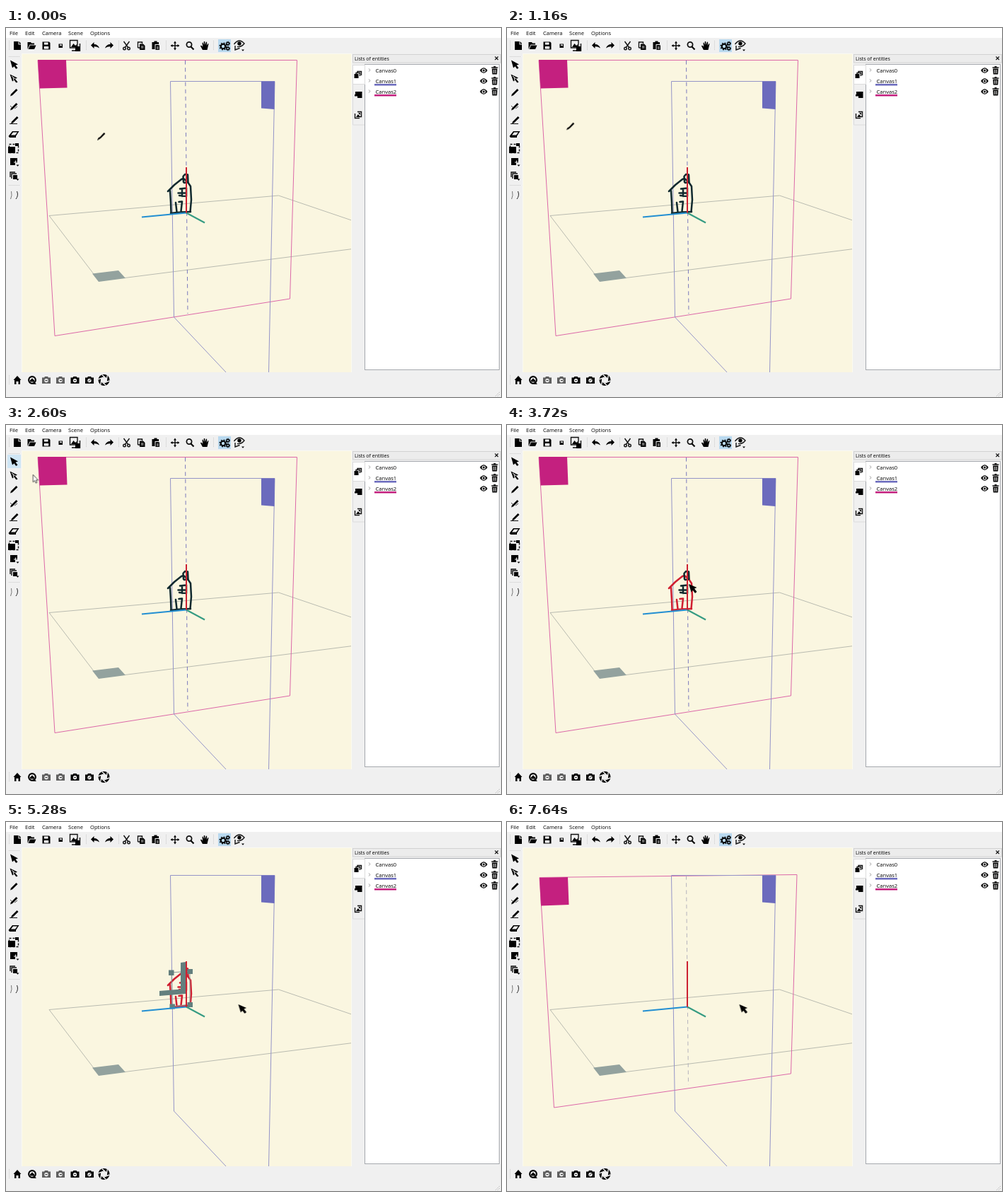
An HTML page for the animation above (8000 ms loop, 700 by 522 pixels).

```html
<!DOCTYPE html>
<html lang="en">
<head>
<meta charset="utf-8">
<title>Sketching on canvases</title>
<style>
html, body { margin: 0; width: 100%; height: 100%; overflow: hidden; background: #f0f0f0; }
svg { display: block; }
text { font: 7.6px "Open Sans", "Noto Sans", sans-serif; fill: #000; }
.line { fill: none; stroke: #111; stroke-width: 1.4; }
.bold { fill: none; stroke: #000; stroke-width: 2.2; }
.thin { fill: none; stroke-width: 1; }
.dash { stroke-dasharray: 5.6 4.6; }
.pink { stroke: #dc68a8; }
.violet { stroke: #9494c8; }
.grey { stroke: #b9bbb0; }
.sep { stroke: #c9c9c9; stroke-dasharray: 1 1; }

/* One shared 8 s clock; hard changes use step-end. */
.cut, #house path { animation: 8s step-end infinite; }
.house { fill: none; stroke: #10292e; stroke-width: 2.5; stroke-linecap: round; stroke-linejoin: round; }
#canvasTall { animation-name: tall; }
#canvasLow { animation-name: low; }
#gizmo { animation-name: gizmo; }
#house { animation-name: house; }
#house .left { animation-name: pickLeft; }
#house .base { animation-name: pickBase; }
#house .right { animation-name: pickRight; }
#house .chimney { animation-name: pickChimney; }
#house .window { animation-name: pickWindow; }
#hover { animation-name: hover; }
#pen { animation-name: pen; }
#arrow { animation-name: arrow; }
#pointer { animation-name: pointer; }
#cursor { animation: move 8s linear infinite; }

@keyframes tall { 0% { visibility: visible } 64.5%, 100% { visibility: hidden } }
@keyframes low { 0% { visibility: hidden } 94%, 100% { visibility: visible } }
@keyframes gizmo { 0% { visibility: hidden } 64.5% { visibility: visible } 94%, 100% { visibility: hidden } }
@keyframes house { 0% { visibility: visible } 94%, 100% { visibility: hidden } }
@keyframes pickLeft { 0% { stroke: #10292e } 43%, 100% { stroke: #d01f31 } }
@keyframes pickBase { 0% { stroke: #10292e } 44.5%, 100% { stroke: #d01f31 } }
@keyframes pickRight { 0% { stroke: #10292e } 45.5%, 100% { stroke: #d01f31 } }
@keyframes pickChimney { 0% { stroke: #10292e } 49%, 100% { stroke: #d01f31 } }
@keyframes pickWindow { 0% { stroke: #10292e } 52%, 100% { stroke: #d01f31 } }
@keyframes hover { 0% { visibility: hidden } 19% { visibility: visible } 33%, 100% { visibility: hidden } }
@keyframes pen { 0% { visibility: visible } 18.5%, 100% { visibility: hidden } }
@keyframes arrow { 0% { visibility: hidden } 18.5% { visibility: visible } 33%, 100% { visibility: hidden } }
@keyframes pointer { 0% { visibility: hidden } 33%, 100% { visibility: visible } }
@keyframes move {
  0%, 9% { transform: translate(129px, 158.5px); animation-timing-function: ease-in }
  14.5% { transform: translate(84px, 144.5px) }
  19.5%, 28.5% { transform: translate(13px, 54px); animation-timing-function: ease-in }
  32.5% { transform: translate(38px, 70px) }
  43% { transform: translate(233px, 238px) }
  44.5% { transform: translate(246px, 256px) }
  46.5% { transform: translate(257px, 225px) }
  49% { transform: translate(252px, 211px) }
  52% { transform: translate(249px, 229px) }
  55%, 58% { transform: translate(240px, 231px); animation-timing-function: ease-in-out }
  63%, 100% { transform: translate(328.5px, 258px) }
}
</style>
</head>
<body>
<svg width="700" height="522" viewBox="0 0 700 522">
  <defs>
    <clipPath id="view"><rect x="23" y="37" width="465" height="450"/></clipPath>
    <path id="brush" d="M-5 5.5L-4 2.5L3.5-5L5.5-3L-2 4.2Z"/>
    <path id="page" d="M-5-6H1.5V-1.5H5V6H-5ZM2.5-6L5-3.2V-2.5H2.5Z"/>
    <path id="select" d="M-5-6L6 0L2.5 1.2L5.5 5L3.2 6.5L.5 2.8L-2 5Z"/>
    <g id="camera"><path d="M-6-3.5H-3L-2-5H2L3-3.5H6V5H-6Z"/><circle cy=".7" r="2.7" fill="#f0f0f0"/></g>
    <g id="eye"><path d="M-5.3 0Q0-7.5 5.3 0Q0 7.5-5.3 0Z"/><circle r="2.6" fill="#fff"/><circle r="1.6"/></g>
    <g id="bin"><path d="M-4.5-4H4.5M-1.5-5.3H1.5" class="line"/><path d="M-3.8-2.5H3.8L3.3 5.5H-3.3Z"/><path d="M-1.6-1V4M0-1V4M1.6-1V4" stroke="#fff" stroke-width=".7"/></g>
    <path id="undo" d="M-6-.5L-1.5-5V-2Q4-2 6 3.5Q2 .8-1.5 1.3V4Z"/>
    <path id="drop" d="M3.5 4.5H7.5L5.5 6.7Z"/>
    <path id="chevron" d="M-1.2-2L1.2 0L-1.2 2" fill="none" stroke="#999" stroke-width=".9"/>
  </defs>

  <rect width="700" height="522" fill="#f0f0f0"/>
  <rect width="700" height="14" fill="#fff"/>
  <g>
    <text x="5" y="9.5">File</text><text x="27" y="9.5">Edit</text><text x="51" y="9.5">Camera</text>
    <text x="88" y="9.5">Scene</text><text x="119" y="9.5">Options</text>
  </g>

  <!-- top toolbar -->
  <path class="sep" d="M4.5 18V32M113.5 18V32M159.5 18V32M226.5 18V32M293.5 18V32"/>
  <rect x="300" y="16" width="18" height="18" fill="#b9d9ef"/>
  <use href="#page" x="16" y="25"/>
  <g transform="translate(36 25)"><path d="M-5.5 5V-5H-1L0-3.5H4V-1.5H-2.5Z"/><path d="M-2-.5H6.5L4 5H-4.5Z"/></g>
  <g transform="translate(57 25)"><path d="M-5.5-5.5H4L5.5-4V5.5H-5.5Z"/><path d="M-3-4.5H2.5V-1.5H-3ZM-3.2 1H3.2V4.5H-3.2Z" fill="#fff"/></g>
  <path d="M74.5 22.5H80V28H74.5Z"/><path d="M76 23.5H79V25H76Z" fill="#fff"/>
  <g transform="translate(97 25)"><path class="line" d="M-6.5-7.5H4V3H-6.5Z"/><path d="M-5 2L-1.5-3L1 0L3-2V2Z"/><path class="line" d="M7.5-3V7H-4"/><path d="M1 1H8V8H1Z"/></g>
  <use href="#undo" x="126" y="25"/>
  <use href="#undo" transform="translate(146 25) scale(-1 1)"/>
  <g transform="translate(170.5 25)"><path class="line" d="M-4-6L2.5 3M4-6L-2.5 3"/><circle class="line" cx="-3" cy="4" r="1.8"/><circle class="line" cx="3" cy="4" r="1.8"/></g>
  <g transform="translate(191 25)"><path class="line" d="M-4.5 3V-5H1.5V-3M-4.5 3H-2"/><path d="M-2-2.5H3L5.5 0V6H-2Z"/><path d="M0 1H3.5M0 3H3.5" stroke="#fff" stroke-width=".8"/></g>
  <g transform="translate(212 25)"><path d="M-5.5-5H-2.5V-6.5H1.5V-5H4V-2H-1.5V5H-5.5Z"/><path d="M-.5-1H3L5-.5V6H-.5Z"/><path d="M1 2H4M1 4H4" stroke="#fff" stroke-width=".8"/></g>
  <g transform="translate(239 25)"><path class="line" d="M-4 0H4M0-4V4"/><path d="M-6.500 0L-3.500-2V2ZM6.500 0L3.500-2V2ZM0-6.500L-2-3.500H2ZM0 6.500L-2 3.500H2Z"/></g>
  <g transform="translate(260 25)"><circle class="line" cx="-1" cy="-1.5" r="3.6" style="stroke-width:1.8"/><path class="bold" d="M1.5 1.5L5.5 5.5"/></g>
  <g transform="translate(281 25)"><path d="M-3 6L-6 .5L-5-.5L-2.8 1.5L-3.5-4L-2.5-4.5L-1.2-1V-6H.2L.7-1L2-5.5L3.2-5L2.8 0L4.5-3L5.5-2.5L3.5 6Z"/></g>
  <g transform="translate(309 25)" fill="none" stroke="#000"><circle cx="-2" cy="1" r="3.2" stroke-width="2"/><circle cx="-2" cy="1" r="4.8" stroke-width="1.5" stroke-dasharray="1.9 1.87"/><circle cx="4.8" cy="-3" r="1.8" stroke-width="1.4"/><circle cx="4.8" cy="-3" r="2.8" stroke-dasharray="1.1 1.1"/><circle cx="4.8" cy="4" r="1.8" stroke-width="1.4"/><circle cx="4.8" cy="4" r="2.8" stroke-dasharray="1.1 1.1"/></g>
  <g transform="translate(329.5 23)"><path class="line" d="M-7 0Q0-9.500 7.500-1Q3 4.500-2.500 3.500M-5.500 2V8L1 5.500"/><circle cx=".5" cy="-1" r="2.700"/><use href="#drop" y="3"/></g>

  <!-- left toolbar -->
  <path class="sep" d="M4 40.5H19M4 222.5H19"/>
  <rect id="hover" class="cut" x="2" y="42" width="19" height="19" fill="#cfe6f5"/>
  <use href="#select" x="11" y="51.5"/>
  <g transform="translate(11 71)"><path d="M-5.5-5.5L5-.5L2 1L5.5 5.5L3.5 6.500L.5 2.700L-2 4.500Z"/><path d="M-3-3L2 1M-1-1L0 3" stroke="#f0f0f0"/></g>
  <use href="#brush" x="11" y="91"/>
  <use href="#brush" x="11" y="111"/><path class="line" d="M6 110L9 113M12 114L16 111" style="stroke-width:.8"/>
  <use href="#brush" x="12" y="130"/><path class="line" d="M5 135.5H16" style="stroke-width:1"/>
  <g transform="translate(11 150)"><path d="M-7.5 3L-2-4H7.5L3 3V5H-6Z"/><path d="M-1-2.5H5L2 1.500H-4Z" fill="#f0f0f0"/></g>
  <g transform="translate(11 170)"><path class="line" d="M-6.5-5.5H6.5V6.5H-6.5Z" stroke-dasharray="3 2"/><path d="M-8-2H2V7H-8ZM2-7H7V-3H2Z"/></g>
  <g transform="translate(11 189)"><path d="M-5-5H5V2H2V5H-5Z"/><path d="M0 1H5M2.5-1.5V3.5" stroke="#f0f0f0"/><use href="#drop"/></g>
  <g transform="translate(11 209)"><path class="line" d="M-5 2V-5H2M-3 4V-3H4"/><path d="M-1-1H5V5H-1Z"/><use href="#drop"/></g>
  <path class="thin" d="M6.500 242Q9 237 7.500 231" stroke="#777"/>
  <path class="thin" d="M14 242Q18 237 15.500 231" stroke="#222"/>

  <!-- viewport -->
  <rect x="22" y="36" width="467" height="451" fill="#fbfaf0"/>
  <rect x="23" y="37" width="465" height="450" fill="#faf6e0"/>
  <g clip-path="url(#view)">
    <path class="thin grey" d="M490 272.5L385.500 237L61 265.500L124 348M168 353.500L490 312.500"/>
    <path d="M122 347.5L159 343L169 354L131 359Z" fill="#93a29e"/>
    <g id="canvasTall" class="cut">
      <path class="thin pink" d="M45 45.500H411.500L401.500 383L69 435.500Z"/>
      <path d="M45 45H85L86.500 84.500L47.500 85.500Z" fill="#c4207f"/>
      <path class="thin dash" stroke="#7a79bd" d="M253.500 46L257 404"/>
    </g>
    <g id="canvasLow" class="cut" visibility="hidden">
      <path class="thin pink" d="M46 78.500L410 74.500L401.500 356L66.500 404Z"/>
      <path d="M46 79L86 78L87.500 117L48 118.500Z" fill="#c4207f"/>
      <path class="thin dash" stroke="#b5b3bd" d="M253.500 76L256.500 372"/>
    </g>
    <path class="thin violet" d="M371.500 488L380 75.500H232.500L237.500 409L312 488"/>
    <path d="M361 75.500H380L379.500 115L361 113.500Z" fill="#6b6bbd"/>
    <g id="house" class="house cut">
      <path class="left" d="M229 231L238 222L248 214L251 213M232 230L233 247L233.500 262"/>
      <path class="base" d="M233 262L247 260.500L261 260M240 247L241.500 260M244.500 246L249 245.500L247.500 259"/>
      <path class="right" d="M251 213L257 218L261 224L262 243L260.500 260"/>
      <path class="chimney" d="M251 218L250.500 210L253 207L257 207.500L257.500 218L252 219"/>
      <path class="window" d="M246 227.500L255 226.500V238L245 237M243.500 233.500H254M249 228V238"/>
    </g>
    <g id="gizmo" class="cut" fill="#637f7e" visibility="hidden">
      <path class="thin" stroke="#8b9a98" d="M234 213L260 211V258L235 261Z"/>
      <path d="M230 209.500H237.500V217H230ZM256.500 208H264V215H256.500ZM231.500 257.500H239V264.500H231.500ZM256.500 255H264V262H256.500Z"/>
      <path d="M247 199L254 198V238H247ZM217 239L254 236V243L217 246Z"/>
    </g>
    <g fill="none" stroke-width="2">
      <path stroke="#238fd2" d="M192 267.500L255 261.500"/>
      <path stroke="#359b82" d="M255 261.500L281 275.500"/>
      <path stroke="#cc2131" d="M255 197V261.500"/>
    </g>
  </g>

  <!-- entity list -->
  <rect x="490.5" y="37.5" width="209" height="11.5" fill="#ececec" stroke="#d2d2d2"/>
  <text x="493" y="46" style="font-size:7px">Lists of entities</text>
  <path class="line" d="M691.5 40.5L696 45M696 40.5L691.5 45" style="stroke-width:1.1"/>
  <rect x="507.5" y="51.5" width="190" height="432" fill="#fff" stroke="#a5a8ad"/>
  <rect x="490.5" y="52.5" width="17" height="27" fill="#fff" stroke="#dcdcdc"/>
  <path d="M490.5 80V137H507" fill="none" stroke="#dcdcdc"/>
  <g transform="translate(498 66)"><path class="line" d="M-3-1V-2.500H2.500V2M-1-3V-4.500H4.500V1"/><path d="M-5.500-1H.5V5H-5.500Z"/></g>
  <path d="M494 90H503.500V99H497V96.500H493V94H494Z"/>
  <g transform="translate(498 123)"><path class="line" d="M-1-4.500H4.500V2.500H2M-4.500-2V4.500H2"/><path d="M-3 3L0-1L3 3ZM0-3H3V0Z"/></g>
  <g>
    <use href="#chevron" x="514" y="59.5"/><use href="#chevron" x="514" y="74.5"/><use href="#chevron" x="514" y="89.5"/>
    <text x="522.5" y="62.5">Canvas0</text><text x="522.5" y="77.5">Canvas1</text><text x="522.5" y="92.5">Canvas2</text>
    <rect x="521" y="79" width="31" height="2.5" fill="#6b6bbd"/><rect x="521" y="94" width="31" height="2.5" fill="#c4207f"/>
    <use href="#eye" x="675.5" y="60"/><use href="#eye" x="675.5" y="75"/><use href="#eye" x="675.5" y="90"/>
    <use href="#bin" x="691" y="60"/><use href="#bin" x="691" y="75"/><use href="#bin" x="691" y="90"/>
  </g>

  <!-- bottom toolbar -->
  <path class="sep" d="M4.5 491V505"/>
  <path d="M10.5 498L16 492L21.5 498H20V504H17.5V500H14.5V504H12V498Z"/>
  <circle class="bold" cx="37" cy="498" r="4.8"/><path d="M34 498.5L37 495.5L40 498.5V500.5H34ZM39 500L43 504H38Z"/>
  <g opacity=".6"><use href="#camera" x="57" y="498"/><use href="#camera" x="77" y="498"/></g>
  <use href="#camera" x="97.5" y="498"/><use href="#camera" x="118" y="498"/>
  <path d="M55.5 498.7H58.5M76 498.7H79M96 498.7H99M116.5 500L119.5 497" class="line" style="stroke-width:1"/>
  <g transform="translate(138.5 498)"><circle r="8"/><path d="M-2.8-7.500L4-1.800M4.700-6.500L3.500 2.600M8 1L-.5 4.400M2.800 7.500L-4 1.800M-4.700 6.500L-3.500-2.600M-8-1L.5-4.400" stroke="#f0f0f0" stroke-width="1.400"/><circle r="3.700" fill="#f0f0f0"/></g>
  <path d="M698 515L692 521M698 518L695 521" stroke="#bbb" stroke-dasharray="1.5 1"/>

  <g id="cursor">
    <path id="pen" class="cut" d="M0 0L1.500-3L4-4.500L9.500-10.500L11.500-9L5.500-3L3.200-1.200Z"/>
    <path id="arrow" class="cut" visibility="hidden" d="M0 0V10.5L2.4 8.400L4 12L5.700 11.200L4.200 7.800H7.300Z" fill="#fff" stroke="#222" stroke-width=".8"/>
    <path id="pointer" class="cut" visibility="hidden" d="M0 0L11.500 5L8 6.500L11.500 11L9 13L5.800 8.800L3.500 11.500Z"/>
  </g>
</svg>
</body>
</html>
```
